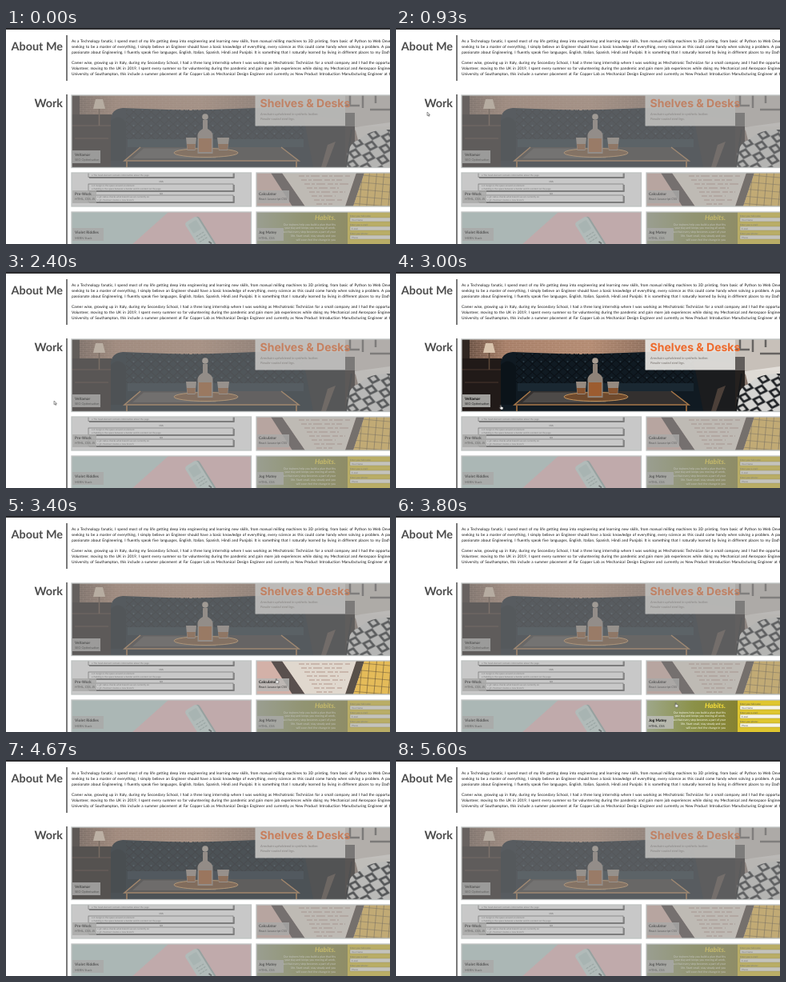
These frames come from a looping animation (480x270 px, 5.74 s). An HTML page:

```html
<!DOCTYPE html>
<html lang="en">
<head>
<meta charset="utf-8">
<title>Portfolio</title>
<style>
html, body { margin: 0; width: 100%; height: 100%; overflow: hidden; background: #fff; }
svg { display: block; width: 480px; height: 270px; }
text { font-family: Lato, "Open Sans", sans-serif; text-rendering: geometricPrecision; }
.head { font-size: 14.4px; font-weight: 700; fill: #4d4d4d; text-anchor: end; }
.body { font-size: 4.8px; fill: #111; word-spacing: .1em; letter-spacing: .02px; }
.name { font-size: 4.7px; font-weight: 700; fill: #000; letter-spacing: .08px; }
.tech { font-size: 3.9px; fill: #222; }
.label { fill: #bdbdbb; fill-opacity: .82; }
.frame { fill: none; stroke: #bfc3c2; stroke-width: 1.3; }
.veil { fill: #989898; fill-opacity: .53; }
.tiny { font-size: 2.9px; fill: #555; }
.veil, .cursor, .arrow, .hand { animation: 5740ms linear infinite; }
.hero { animation-name: hero; }
.prework { animation-name: prework; }
.calc { animation-name: calc; }
.pastel { animation-name: pastel; }
.run { animation-name: run; }
.cursor { animation-name: travel; }
.arrow { animation-name: arrow; animation-timing-function: step-end; }
.hand { animation-name: hand; animation-timing-function: step-end; }

/* each veil lifts while the pointer is over its card */
@keyframes hero {
  0%, 25.3% { opacity: 1; }
  28.5%, 38.7% { opacity: 0; }
  42.2%, 47% { opacity: 1; }
  50.5%, 55.7% { opacity: 0; }
  59.4%, 76.7% { opacity: 1; }
  78.4% { opacity: .5; }
  82.8%, 100% { opacity: 1; }
}
@keyframes calc {
  0%, 57.1% { opacity: 1; }
  60%, 62.5% { opacity: 0; }
  65.8%, 100% { opacity: 1; }
}
@keyframes run {
  0%, 62.7% { opacity: 1; }
  65.6%, 68% { opacity: 0; }
  71.5%, 100% { opacity: 1; }
}
@keyframes pastel {
  0%, 68.2% { opacity: 1; }
  71%, 72.2% { opacity: 0; }
  75.2%, 100% { opacity: 1; }
}
@keyframes prework {
  0%, 72.8% { opacity: 1; }
  75.2%, 76.5% { opacity: 0; }
  80%, 100% { opacity: 1; }
}
@keyframes travel {
  0%, 8.2% { transform: translate(120px, -9px); }
  12.2% { transform: translate(60px, 60px); }
  13.9% { transform: translate(33px, 92px); }
  16.2% { transform: translate(39px, 105px); }
  18.6% { transform: translate(44px, 109px); }
  25.3% { transform: translate(82px, 143px); }
  32.6% { transform: translate(122px, 168px); }
  34.1% { transform: translate(124px, 169px); }
  38.7% { transform: translate(82px, 165px); }
  42.7% { transform: translate(54px, 160px); }
  47% { transform: translate(82px, 162px); }
  52.3% { transform: translate(130px, 166px); }
  55.7% { transform: translate(260px, 174px); }
  57.1% { transform: translate(316px, 186px); }
  60.1% { transform: translate(345px, 210px); }
  62.7% { transform: translate(350px, 229px); }
  66.2% { transform: translate(349px, 233px); }
  68% { transform: translate(313px, 246px); }
  69.7% { transform: translate(271px, 250px); }
  72.2% { transform: translate(271px, 230px); }
  75.4% { transform: translate(279px, 196px); }
  76.7% { transform: translate(284px, 174px); }
  78.4% { transform: translate(292px, 84px); }
  80.1%, 100% { transform: translate(300px, -9px); }
}
@keyframes arrow {
  0% { opacity: 1; } 25.3% { opacity: 0; } 38.7% { opacity: 1; }
  47% { opacity: 0; } 78.4% { opacity: 1; } 100% { opacity: 1; }
}
@keyframes hand {
  0% { opacity: 0; } 25.3% { opacity: 1; } 38.7% { opacity: 0; }
  47% { opacity: 1; } 78.4% { opacity: 0; } 100% { opacity: 0; }
}
</style>
</head>
<body>
<svg viewBox="0 0 480 270">
  <defs>
    <pattern id="brick" width="9" height="5" patternUnits="userSpaceOnUse">
      <path d="M0 .4H9M0 2.900H9M2 .4V2.900M6.500 2.900V5" stroke="#d9b9a4" stroke-opacity=".3" stroke-width=".7"/>
    </pattern>
    <pattern id="tuft" width="11" height="10" patternUnits="userSpaceOnUse">
      <path d="M0 0L5.500 5L11 0M0 10L5.500 5L11 10" fill="none" stroke="#0a1016" stroke-width="1.200"/>
      <circle cx="5.500" cy="2" r="1" fill="#2b3a45"/>
    </pattern>
    <pattern id="weave" width="18" height="14" patternUnits="userSpaceOnUse" patternTransform="rotate(12)">
      <rect width="18" height="14" fill="#d5d5d2"/>
      <path d="M0 7L9 0L18 7L9 14Z" fill="#1d2023"/>
      <path d="M4.500 7L9 3.500L13.500 7L9 10.500Z" fill="#d5d5d2"/>
    </pattern>
    <pattern id="keys" width="9" height="9" patternUnits="userSpaceOnUse" patternTransform="rotate(5)">
      <rect width="9" height="9" fill="#f0c04f"/>
      <path d="M0 0H9M0 0V9" stroke="#5a4828" stroke-width="1.200"/>
    </pattern>
    <linearGradient id="wall">
      <stop offset="0" stop-color="#5d483c"/>
      <stop offset=".14" stop-color="#a57d66"/>
      <stop offset=".4" stop-color="#b28a71"/>
      <stop offset=".6" stop-color="#876a59"/>
      <stop offset="1" stop-color="#857870"/>
    </linearGradient>
    <linearGradient id="meadow">
      <stop offset="0" stop-color="#9ea78a"/>
      <stop offset=".35" stop-color="#8b9148"/>
      <stop offset=".7" stop-color="#85802f"/>
    </linearGradient>
    <clipPath id="heroBox"><rect x="82" y="84" width="400" height="90"/></clipPath>
    <clipPath id="preBox"><rect x="82" y="181" width="224" height="42"/></clipPath>
    <clipPath id="calcBox"><rect x="313" y="181" width="170" height="42"/></clipPath>
    <clipPath id="pastelBox"><rect x="82" y="230" width="224" height="42"/></clipPath>
    <clipPath id="runBox"><rect x="313" y="230" width="170" height="42"/></clipPath>
  </defs>

  <rect width="480" height="270" fill="#fff"/>
  <rect width="480" height="2" fill="#2b2b2e"/>

  <text class="head" x="71" y="28">About Me</text>
  <text class="head" x="71" y="99">Work</text>
  <path d="M76 9V66M76 83V270" stroke="#4d4d4d" stroke-width="1.500"/>

  <g class="body">
    <text x="82" y="17.800">As a Technology fanatic, I spend most of my life getting deep into engineering and learning new skills, from manual milling machines to 3D printing, from basic of Python to Web Development,</text>
    <text x="82" y="25">seeking to be a master of everything, I simply believe an Engineer should have a basic knowledge of everything, every science as this could come handy when solving a problem. A part from being</text>
    <text x="82" y="32.200">passionate about Engineering, I fluently speak five languages, English, Italian, Spanish, Hindi and Punjabi. It is something that I naturally learned by living in different places to my Dad's job.</text>
    <text x="82" y="45">Career wise, growing up in Italy, during my Secondary School, I had a three long internship where I was working as Mechatronic Technician for a small company and I had the opportunity to</text>
    <text x="82" y="52.200">Volunteer, moving to the UK in 2019, I spent every summer so far volunteering during the pandemic and gain more job experiences while doing my Mechanical and Aerospace Engineering at</text>
    <text x="82" y="59.400">University of Southampton, this include a summer placement at Far Copper Lab as Mechanical Design Engineer and currently as New Product Introduction Manufacturing Engineer at the</text>
  </g>

  <!-- lounge -->
  <g clip-path="url(#heroBox)">
    <rect x="82" y="84" width="400" height="90" fill="url(#wall)"/>
    <rect x="82" y="84" width="230" height="45" fill="url(#brick)"/>
    <path d="M82 150H482V174H82Z" fill="#15110f"/>
    <!-- sideboard and lamp -->
    <path d="M82 84H92V118H82Z" fill="#302722"/>
    <path d="M82 108H132V174H82Z" fill="#211a18"/>
    <path d="M82 122H131M86 138H128" stroke="#4a372d" stroke-width="1.200"/>
    <path d="M112 89H121L124 101H109Z" fill="#d9c4ad"/>
    <path d="M116.500 101V122" stroke="#5e4838" stroke-width="1.500"/>
    <!-- sofa -->
    <path d="M131 114Q132 101 146 100L230 103L312 100H424V174H131Z" fill="#101a22"/>
    <path d="M150 102H372V140H150Z" fill="url(#tuft)"/>
    <path d="M152 139H372V149H152Z" fill="#1a2832"/>
    <path d="M131 116Q141 106 150 118V166H131Z" fill="#0b1319"/>
    <path d="M372 112Q400 108 424 116V174H384Z" fill="#1b1c1e"/>
    <path d="M402 146L412 142L400 174H394Z" fill="#4c4039"/>
    <!-- table -->
    <path d="M168 149H344L366 166H148Z" fill="#33302f"/>
    <path d="M172 150.500H270L262 163H158Z" fill="#4d4a48"/>
    <path d="M168 149L148 166H366L344 149" fill="none" stroke="#a87849" stroke-width="1.500"/>
    <path d="M151 167V174M363 167V174" stroke="#8a6038" stroke-width="2"/>
    <ellipse cx="250" cy="156" rx="40" ry="5.500" fill="#6f4a2d" stroke="#c3935c"/>
    <!-- decanter and glasses -->
    <circle cx="249" cy="111" r="3.800" fill="#a99d92"/>
    <path d="M246 115H252V126Q258 129 258.500 134V157H239.500V134Q240 129 246 126Z" fill="#8f8379"/>
    <path d="M241 138H257V155H241Z" fill="#9c5c30"/>
    <path d="M225 137H238L236.500 153H226.500ZM264 137H279L277 153H266Z" fill="#968a80"/>
    <path d="M226 145H237L236 152H227ZM265 145H278L276.500 152H266.500Z" fill="#87532f"/>
    <!-- window, lamp and patterned chair -->
    <path d="M424 84H480V128H424Z" fill="#b7aea6"/>
    <path d="M430 84V96M446 84V100M462 84V94M424 97H442M455 102H480" stroke="#2d2a28" stroke-width="2.500"/>
    <path d="M424 106H436V174H424Z" fill="#25211f"/>
    <path d="M436 124L480 118V132L440 140Z" fill="#dedad4"/>
    <path d="M426 158Q430 143 442 139Q456 126 480 127V174H426Z" fill="url(#weave)"/>
    <path d="M432 127L425 174" stroke="#17191b" stroke-width="2"/>
    <!-- caption -->
    <path d="M424 84H480V123H424Z" fill="#ece9e5" fill-opacity=".3"/>
    <path d="M311.500 84H424V122.500H311.500Z" fill="#eeebe8" fill-opacity=".9"/>
    <text x="317.500" y="99" style="font:700 14px Inter,sans-serif" fill="#ee6a2c">Shelves &amp; Desks</text>
    <g font-size="4.100" font-style="italic" fill="#77716d">
      <text x="318" y="108.500">Armchairs upholstered in synthetic leather.</text>
      <text x="318" y="114.500">Powder-coated steel legs.</text>
    </g>
    <rect class="label" x="83" y="153" width="35" height="16"/>
    <text class="name" x="86" y="159.500">Veltamar</text>
    <text class="tech" x="86" y="166">SEO Optimisation</text>
    <rect class="veil hero" x="82" y="84" width="400" height="90"/>
  </g>
  <rect class="frame" x="82" y="84" width="402" height="90.500"/>

  <!-- study notes -->
  <g clip-path="url(#preBox)">
    <rect x="82" y="181" width="224" height="42" fill="#fff"/>
    <g fill="#fff" stroke="#333" stroke-width=".6">
      <rect x="103" y="178" width="181" height="8.500"/>
      <rect x="103" y="195" width="181" height="8.500"/>
      <rect x="103" y="209" width="181" height="8.500"/>
    </g>
    <path d="M104 187.200H285V180M104 204.200H285V196M104 218.200H285V210" fill="none" stroke="#333" stroke-width="1.200"/>
    <g class="tiny">
      <text x="107" y="184.600">• The head element contains information about the page</text>
      <text x="107" y="198.400">• A margin is the space around an element</text>
      <text x="107" y="202.200">• Padding is the space between a border and its content on the page</text>
      <text x="114" y="212.400">• git status checks what branch we are currently on</text>
      <text x="114" y="216.200">• git checkout creates a new branch</text>
      <text x="194" y="193" text-anchor="middle" font-weight="700">CSS</text>
      <text x="194" y="207.600" text-anchor="middle" font-weight="700">Git</text>
    </g>
    <rect class="label" x="83" y="203" width="30" height="16"/>
    <text class="name" x="86" y="208.500">Pre-Work</text>
    <text class="tech" x="86" y="215">HTML, CSS, JS</text>
    <rect class="veil prework" x="82" y="181" width="224" height="42"/>
  </g>
  <rect class="frame" x="82" y="181" width="224.500" height="42"/>

  <!-- desk with code -->
  <g clip-path="url(#calcBox)">
    <rect x="313" y="181" width="170" height="42" fill="#dcb5aa"/>
    <path d="M331 181H345L374 223H358Z" fill="#4f4442"/>
    <path d="M345 181H438L424 223H374Z" fill="#ebe2d6"/>
    <path d="M366 185H430M369 190H420M373 195H428M376 200H416M379 205H424M382 210H412M385 215H420M388 220H408" stroke="#b08b7d" stroke-width=".9" stroke-dasharray="7 2 4 2 11 3"/>
    <path d="M438 181H448L434 223H424Z" fill="#4e443c"/>
    <path d="M448 181H482V223H434Z" fill="url(#keys)"/>
    <rect class="label" x="314" y="203" width="40" height="16"/>
    <text class="name" x="316" y="208.500">Calculator</text>
    <text class="tech" x="316" y="214.500">React Javascript CSS</text>
    <rect class="veil calc" x="313" y="181" width="170" height="42"/>
  </g>
  <rect class="frame" x="313" y="181" width="172" height="42"/>

  <!-- pastel phone -->
  <g clip-path="url(#pastelBox)">
    <rect x="82" y="230" width="224" height="42" fill="#c3dcd8"/>
    <path d="M203 230H306V272H156Z" fill="#efbfc2"/>
    <g transform="rotate(-32 232 242)">
      <rect x="225" y="240" width="18" height="46" rx="4" fill="#97aeab"/>
      <rect x="223" y="239" width="18" height="46" rx="4" fill="#cfe4df"/>
      <rect x="226" y="243" width="12" height="13" rx="1.500" fill="#bcd5d0"/>
      <path d="M227 261H238M227 265H238M227 269H238" stroke="#9db5b1" stroke-width="1.100" stroke-dasharray="3 1"/>
    </g>
    <path d="M253.500 267L257 269.500" stroke="#42494a" stroke-width="1.800"/>
    <rect class="label" x="83" y="250" width="39" height="16"/>
    <text class="name" x="86" y="256.500">Violet Riddles</text>
    <text class="tech" x="86" y="263.500">MERN Stack</text>
    <rect class="veil pastel" x="82" y="230" width="224" height="42"/>
  </g>
  <rect class="frame" x="82" y="230" width="224.500" height="44"/>

  <!-- fitness page -->
  <g clip-path="url(#runBox)">
    <rect x="313" y="230" width="170" height="42" fill="url(#meadow)"/>
    <text x="412" y="239.500" text-anchor="end" font-size="8.600" font-weight="700" font-style="italic" fill="#fce23a">Habits.</text>
    <g font-size="3.600" fill="#fbfaf0" text-anchor="end">
      <text x="412" y="246.500">Our trainers help you build a plan that fits</text>
      <text x="412" y="251.300">your day and keeps you moving all week,</text>
      <text x="412" y="256.100">so that every step becomes a part of your</text>
      <text x="412" y="260.900">life. Start small, stay steady and you</text>
      <text x="412" y="265.700">will soon feel the change in you</text>
    </g>
    <rect x="427" y="230" width="55" height="42" fill="#dfc62f"/>
    <g fill="#f7f5e6" stroke="#8b7e1b" stroke-width=".4">
      <rect x="430" y="237" width="52" height="5"/>
      <rect x="430" y="248" width="52" height="5"/>
      <rect x="430" y="259" width="52" height="5"/>
    </g>
    <g class="tiny">
      <text x="430" y="235.500">Enter your full name:</text>
      <text x="430" y="246.700">Enter your e-mail:</text>
      <text x="430" y="257.700">Enter your phone:</text>
      <text x="432" y="240.700">Your Name</text>
      <text x="432" y="251.700">E-mail</text>
      <text x="432" y="262.700">Phone</text>
    </g>
    <rect class="label" x="314" y="250" width="33" height="16"/>
    <text class="name" x="316" y="256.500">Jog Matey</text>
    <text class="tech" x="316" y="263.500">HTML, CSS</text>
    <rect class="veil run" x="313" y="230" width="170" height="42"/>
  </g>
  <rect class="frame" x="313" y="230" width="172" height="44"/>

  <g class="cursor" stroke="#222" stroke-width=".5" fill="#fff">
    <path class="arrow" d="M0 0V4.600L1.100 3.700L1.900 5.400L2.700 5L1.900 3.400H3.300Z"/>
    <path class="hand" d="M.5 .5Q1 -.1 1.500 .5V2.300L3.800 2.900Q4.200 3.200 4 4.200L3.500 6H1.200L-.6 3.800Q-.4 3 .5 3.700Z"/>
  </g>
</svg>
</body>
</html>
```
